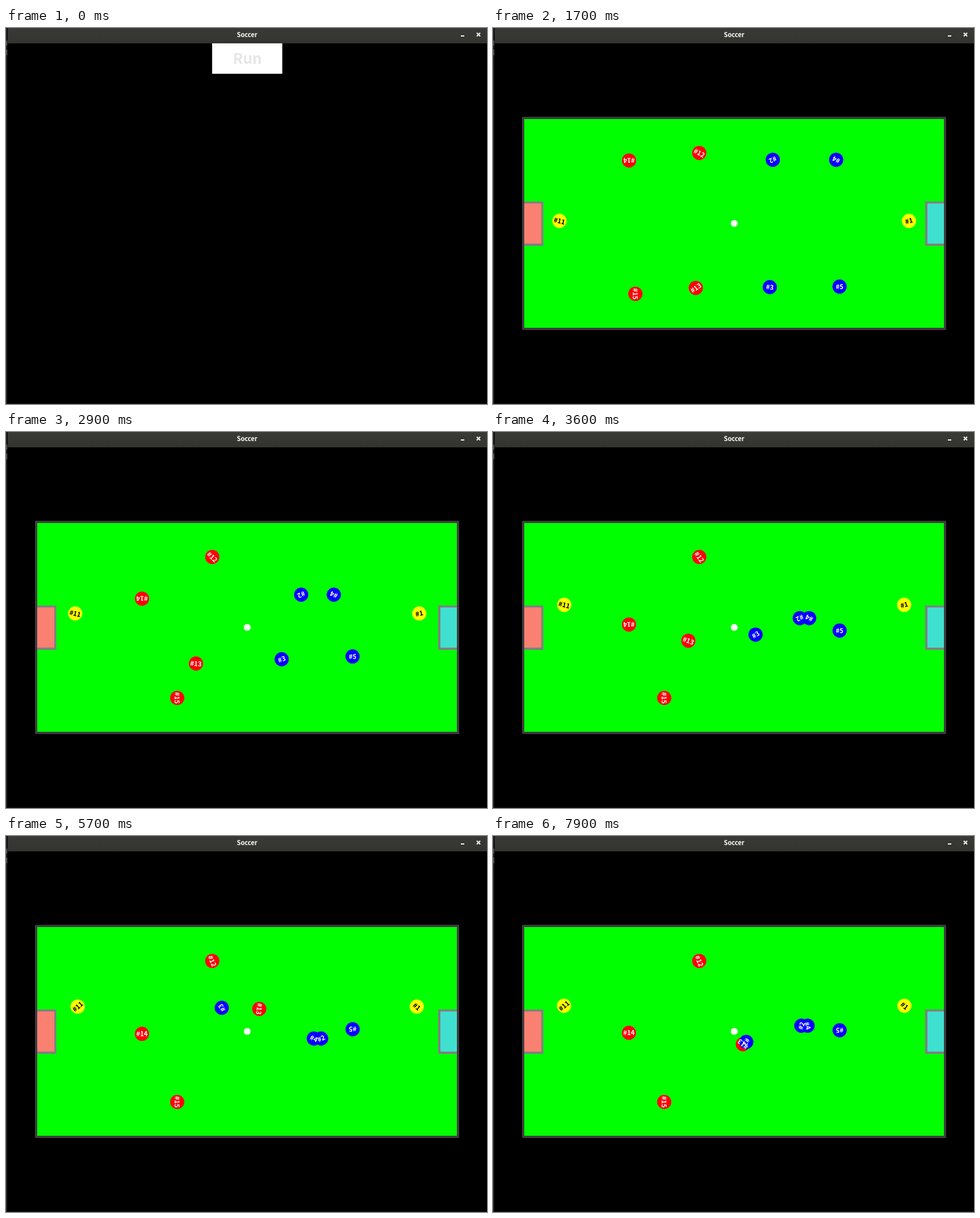
Recreate the animation shown at these times as an HTML page with a canvas. Size 847 by 661 pixels, loop 8 s.

```html
<!DOCTYPE html>
<html>
<head>
<meta charset="utf-8">
<title>Soccer</title>
<style>
  html, body { margin: 0; width: 100%; height: 100%; overflow: hidden; background: #000; }
  canvas { display: block; }
</style>
</head>
<body>
<canvas id="stage" width="847" height="661"></canvas>
<script>
const ctx = document.getElementById('stage').getContext('2d');
const FONT = '"Noto Sans CJK SC", "Noto Sans CJK JP", "Noto Sans", sans-serif';
const LOOP = 8, FIELD_AT = 0.9, KICKOFF = 1.2;
const YELLOW = '#ff0', RED = '#f00', BLUE = '#00f';

// Players line up on an even grid around the centre spot
const spot = (col, row) => [KICKOFF, 425 + col * 61.8, 343.5 + row * 123.8];

// Paths are waypoints [seconds, x, y]
const keeper = [spot(-5, 0), [3.7, 126, 301.5], [4.6, 126.5, 300.3], [7.9, 125, 298.5]];
const winger = [spot(1, -1), [4.35, 565, 377], [6.6, 544.5, 334], [7.9, 543, 333.5]];
const back = [spot(-3, -1), [3.8, 239.4, 352.5], [6.2, 239.4, 346]];
const mirrorX = (path, sum) => path.map(([t, x, y]) => [t, sum - x, y]);
const turnAround = path => path.map(([t, x, y]) => [t, 849.8 - x, 687.5 - y]);

const players = [
  { n: 11, color: YELLOW, path: keeper },
  { n: 12, color: RED, path: [spot(-1, -1)], turn: t => Math.min(68, 15 * t + 1) },
  { n: 13, color: RED, curved: true, path: [spot(-1, 1),
    [2.9, 334.5, 407], [4.5, 373, 317.5], [5.7, 446, 304], [6.5, 473, 327.5], [7.9, 440, 366]] },
  { n: 14, color: RED, path: back },
  { n: 15, color: RED, path: [spot(-3, 1), [2.9, 301.5, 467.5]] },
  { n: 1, color: YELLOW, path: mirrorX(keeper, 849.5) },
  { n: 2, color: BLUE, path: winger },
  { n: 3, color: BLUE, curved: true, path: [spot(1, 1),
    [2.9, 485.5, 399.5], [4.5, 423, 305], [5.7, 380, 302], [6.5, 384, 326], [7.9, 446, 362]] },
  { n: 4, color: BLUE, path: mirrorX(winger, 1097) },
  { n: 5, color: BLUE, path: turnAround(back) }
];

// Straight legs speed up from each waypoint; curved paths pass smoothly through theirs
function position({ path, curved }, t) {
  const last = path.length - 1;
  if (t <= path[0][0]) return path[0].slice(1);
  if (t >= path[last][0]) return path[last].slice(1);
  const i = path.findIndex(p => p[0] > t) - 1;
  const a = path[i], b = path[i + 1];
  const h = b[0] - a[0];
  const part = (t - a[0]) / h;
  const u = curved && i > 0 ? part : part ** 1.4, v = 1 - u;
  const slope = (k, axis) => {
    const p = path[Math.max(k - 1, 0)], q = path[Math.min(k + 1, last)];
    return (q[axis] - p[axis]) / (q[0] - p[0]);
  };
  return [1, 2].map(axis => curved
    ? a[axis] * v * v * (1 + 2 * u) + b[axis] * u * u * (3 - 2 * u)
      + h * u * v * (slope(i, axis) * v - slope(i + 1, axis) * u)
    : a[axis] * v + b[axis] * u);
}

// Each player faces the way it runs, and keeps that pose when it stops
function heading(p, t) {
  if (p.turn) return p.turn(t) * Math.PI / 180;
  const end = p.path[p.path.length - 1][0];
  const from = Math.max(KICKOFF, Math.min(t, end - 0.03));
  const [x0, y0] = position(p, from), [x1, y1] = position(p, from + 0.02);
  return Math.atan2(y1 - y0, x1 - x0) + Math.PI / 2;
}

function rect(color, x, y, w, h) {
  ctx.fillStyle = color;
  ctx.fillRect(x, y, w, h);
}

function disc(color, x, y, radius) {
  ctx.fillStyle = color;
  ctx.beginPath();
  ctx.arc(x, y, radius, 0, 2 * Math.PI);
  ctx.fill();
}

function text(str, x, y, size, color, weight = 700) {
  ctx.font = `${weight} ${size}px ${FONT}`;
  ctx.textAlign = 'center';
  ctx.fillStyle = color;
  ctx.fillText(str, x, y);
}

function drawWindow() {
  rect('#000', 0, 0, 847, 661);
  rect('#262626', 0, 0, 2, 661);
  const bar = ctx.createLinearGradient(0, 0, 0, 27);
  bar.addColorStop(0, '#3a3a36');
  bar.addColorStop(1, '#333330');
  rect(bar, 3, 0, 844, 27);
  rect('#888', 1, 22, 1, 9);
  rect('#888', 1, 38, 1, 10);
  rect('#24141c', 3, 660, 844, 1);
  text('Soccer', 424.5, 15.5, 11, '#fff');
  rect('#fff', 801, 13, 6, 2);
  ctx.strokeStyle = '#fff';
  ctx.lineWidth = 2;
  ctx.beginPath();
  ctx.moveTo(829, 8.5);
  ctx.lineTo(835, 14.5);
  ctx.moveTo(835, 8.5);
  ctx.lineTo(829, 14.5);
  ctx.stroke();
}

function drawGoal(color, x, inset) {
  rect('#808080', x, 305, 33.5, 78);
  rect(color, x + inset, 308.5, 30, 70.5);
}

function drawField() {
  rect('#0f0', 55, 159, 740, 369);
  drawGoal('#fa8072', 55, 0);
  drawGoal('#40e0d0', 761, 4);
  ctx.strokeStyle = '#3e3c3e';
  ctx.lineWidth = 4;
  ctx.lineJoin = 'round';
  ctx.strokeRect(53, 158, 743, 371);
  disc('#fff', 424.8, 343.5, 6);
}

function drawLabel(p, t) {
  ctx.save();
  ctx.translate(...position(p, t));
  ctx.rotate(heading(p, t));
  text('#' + p.n, 0, 4.4, 11.5, p.color === YELLOW ? '#000' : '#fff', 900);
  ctx.restore();
}

function frame(now) {
  const t = Math.floor(now / 100) % (LOOP * 10) / 10;
  drawWindow();
  if (t < FIELD_AT) {
    rect('#fff', 363, 27, 123.5, 53.5);
    text('Run', 425, 63, 26, '#e6e6e6');
  } else {
    drawField();
    players.forEach(p => disc(p.color, ...position(p, t), 12.5));
    players.forEach(p => drawLabel(p, t));
  }
  requestAnimationFrame(frame);
}
requestAnimationFrame(frame);
</script>
</body>
</html>
```
